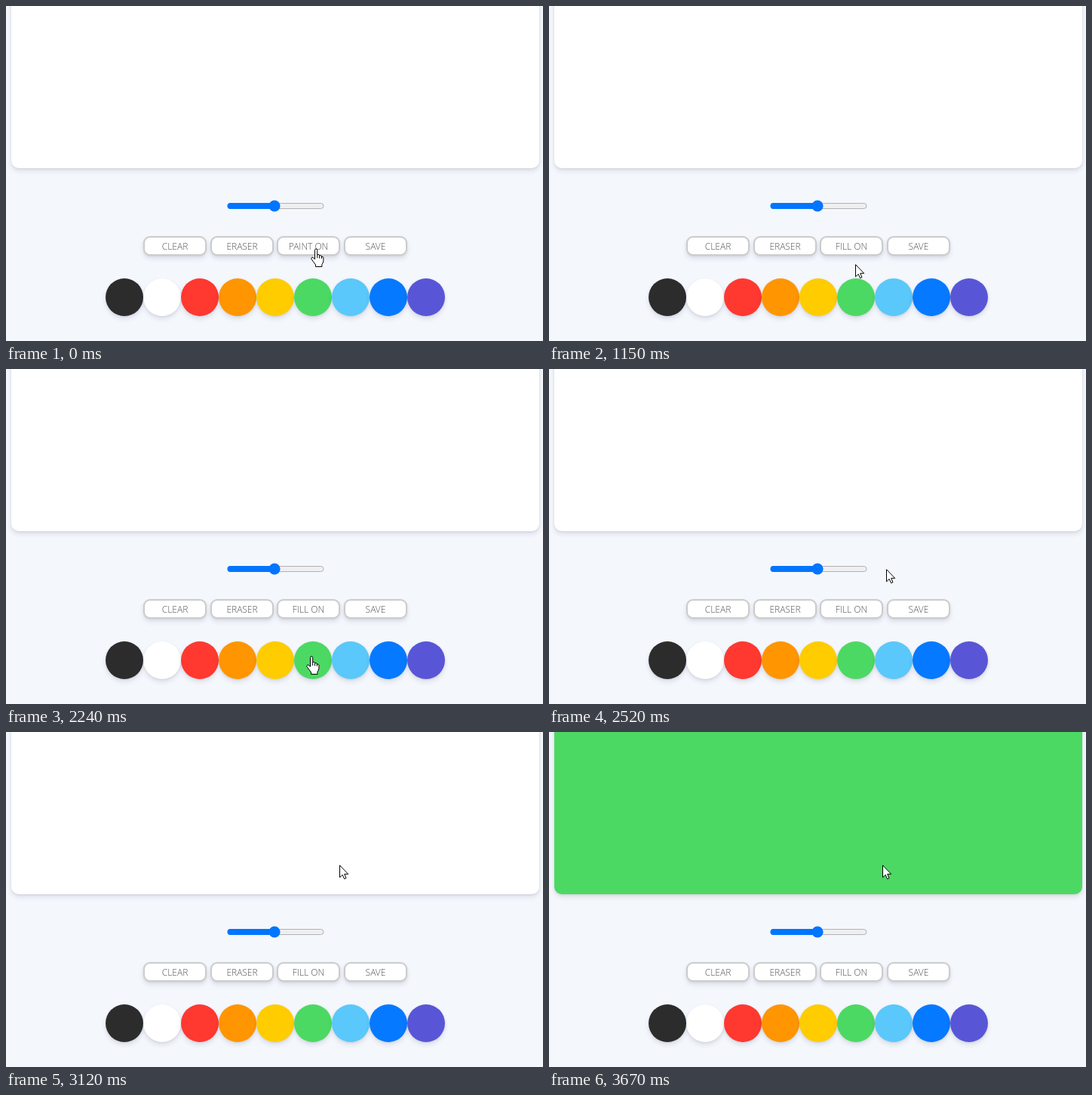
Write an HTML page that moves like this. It is 712x444 px and loops after 3.79 s.

```html
<!DOCTYPE html>
<html lang="en">
<head>
<meta charset="utf-8">
<title>Paint board</title>
<style>
  html, body { margin: 0; width: 100%; height: 100%; overflow: hidden; }
  body { position: relative; background: #f4f7fc; }
  .board, .btn, .color {
    position: absolute;
    box-sizing: border-box;
    box-shadow: 0 4px 6px rgba(50, 50, 93, .11), 0 1px 3px rgba(0, 0, 0, .08);
  }
  .board { left: 7px; top: -485px; width: 700px; height: 700px; border-radius: 10px; background: #fff; }
  .btn {
    top: 305px; width: 84px; height: 26px;
    border: 2px solid rgba(0, 0, 0, .2); border-radius: 9px;
    background: #fff; color: #555;
    font: 300 12px/23px "Open Sans", sans-serif;
    text-align: center; white-space: nowrap;
  }
  .color { top: 361px; width: 50px; height: 50px; border-radius: 50%; }
  svg { position: absolute; left: 0; top: 0; }
</style>
</head>
<body>
<div class="board" id="board"></div>
<svg width="712" height="444" viewBox="0 0 712 444">
  <rect x="294" y="261.5" width="127" height="7" rx="3.5" fill="#efefef" stroke="#b2b2b2"/>
  <rect x="293.5" y="261" width="62" height="8" rx="4" fill="#0075ff"/>
  <circle cx="356" cy="265" r="7.6" fill="#0075ff"/>
</svg>
<div id="controls"></div>
<svg width="712" height="444" viewBox="0 0 712 444">
  <g id="cursor" fill="#fff" stroke="#000" stroke-linejoin="round">
    <path id="arrow" stroke-linejoin="miter" d="M.5 .7V16.8L4.2 13.3L6.6 18.7L9 17.7L6.7 12.3H11.7Z"/>
    <g id="hand" transform="translate(-7 0)">
      <path d="M5.5 14.5V2.5a1.6 1.6 0 0 1 3.2 0V8.8q1.4-1.2 2.8 .4v.8q1.5-1.2 2.8 .5v.8q2.2-1 2.6 1.4V16.5q0 2.6-2 5V24.5H6.5V22L1.1 14.6q-.9-1.9 .6-2.4q1.3-.3 2.3 1z"/>
      <path fill="none" d="M8.7 8.8V13M11.5 9.6V13.5M14.3 10.8V14"/>
    </g>
  </g>
</svg>
<script>
const LOOP = 3790, PRESS = 90, RELEASE = 180, FILL = 3150;
const GREEN = '#4cd963';
const labels = ['CLEAR', 'ERASER', 'PAINT ON', 'SAVE'];
const colors = ['#2c2c2c', '#fff', '#ff3830', '#ff9500', '#ffcc00', GREEN, '#5ac8fa', '#0579ff', '#5856d6'];
const btnX = [182, 271, 359, 448];
const $ = id => document.getElementById(id);
const [board, cursor, arrow, hand] = ['board', 'cursor', 'arrow', 'hand'].map($);

function add(cls, x, text = '') {
  const el = document.createElement('div');
  el.className = cls;
  el.style.left = x + 'px';
  el.textContent = text;
  return $('controls').appendChild(el);
}
const mode = labels.map((s, i) => add('btn', btnX[i], s))[2];
colors.forEach((c, i) => add('color', 132 + 50 * i).style.background = c);

// Pointer stops: time, x, y, then speed in px per ms
const stops = [
  [1000, 411, 321, 0, 0],
  [1150, 406, 342, -.025, .17],
  [1520, 405, 380, 0, 0],
  [2240, 405, 380, 0, 0],
  [2520, 447, 266, .06, -.5],
  [2760, 442, 176, 0, 0]
];

function hermite(p, q, u, dt, axis) {
  const u2 = u * u, u3 = u2 * u;
  return (2 * u3 - 3 * u2 + 1) * p[axis] + (3 * u2 - 2 * u3) * q[axis]
    + dt * ((u3 - 2 * u2 + u) * p[axis + 2] + (u3 - u2) * q[axis + 2]);
}

function pointer(t) {
  const last = stops[stops.length - 1];
  if (t <= stops[0][0]) return stops[0].slice(1, 3);
  if (t >= last[0]) return last.slice(1, 3);
  const i = stops.findIndex(s => s[0] > t);
  const p = stops[i - 1], q = stops[i], dt = q[0] - p[0], u = (t - p[0]) / dt;
  return [1, 2].map(axis => Math.round(hermite(p, q, u, dt, axis)));
}

function clickable(x, y) {
  const onButton = y >= 305 && y < 331 && btnX.some(b => x >= b && x < b + 84);
  return onButton || colors.some((c, i) => Math.hypot(x - 157 - 50 * i, y - 386) < 25);
}

function draw(t) {
  const [x, y] = pointer(t);
  const over = clickable(x, y);
  cursor.setAttribute('transform', `translate(${x} ${y})`);
  hand.style.display = over ? '' : 'none';
  arrow.style.display = over ? 'none' : '';
  mode.textContent = t < RELEASE ? 'PAINT ON' : 'FILL ON';
  mode.style.transform = t >= PRESS && t < RELEASE ? 'scale(.98)' : 'none';
  board.style.background = t < FILL ? '#fff' : GREEN;
}

const start = performance.now();
function tick() {
  draw((performance.now() - start) % LOOP);
  requestAnimationFrame(tick);
}
tick();
</script>
</body>
</html>
```
